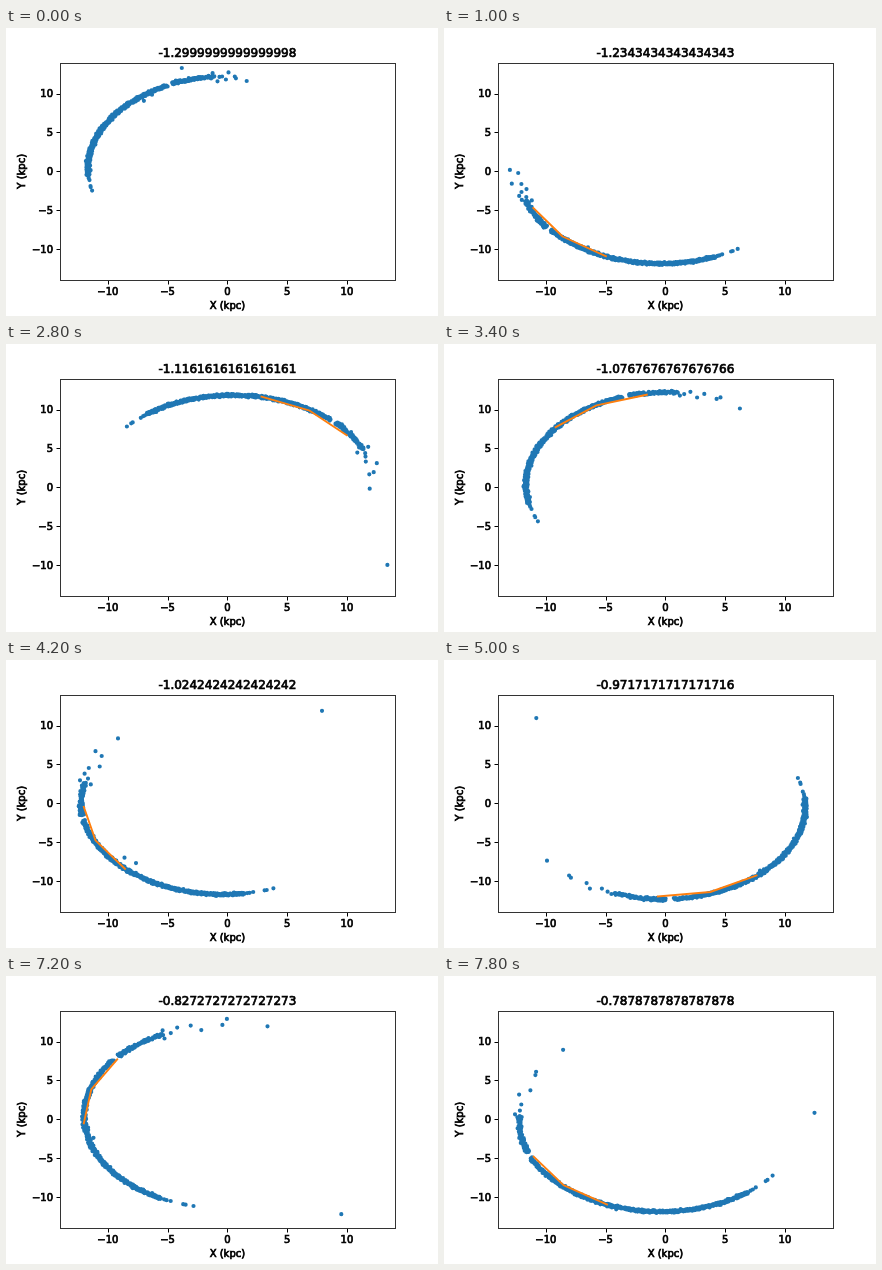
An HTML page that plays this animation: 432 by 288 pixels, repeating every 8000 ms.

```html
<!DOCTYPE html>
<html lang="en">
<head>
<meta charset="utf-8">
<title>Stream orbit</title>
<style>
  html, body { margin: 0; width: 100%; height: 100%; overflow: hidden; background: #fff; }
  svg { display: block; width: 100%; height: 100%; }
  text { font: 10px "DejaVu Sans", sans-serif; stroke: #000; stroke-width: .7px; text-anchor: middle; }
  #title { font-size: 12px; }
  .axes { fill: none; stroke: #000; }
  rect.axes { stroke: #333; }
</style>
</head>
<body>
<svg viewBox="0 0 432 288">
  <defs><clipPath id="box"><rect x="54" y="34.6" width="334.8" height="217.4"/></clipPath></defs>
  <g clip-path="url(#box)" fill="none">
    <path id="dots" stroke="#1f77b4" stroke-width="4.2" stroke-linecap="round"/>
    <path id="trail" stroke="#ff7f0e" stroke-width="1.9" stroke-linecap="square" stroke-linejoin="round"/>
  </g>
  <path id="ticks" class="axes"/>
  <rect class="axes" x="54.5" y="35.5" width="335" height="217"/>
  <g id="labels"></g>
  <text id="title" x="221.4" y="28.5"></text>
  <text x="221.4" y="280.6">X (kpc)</text>
  <text transform="translate(19.4 143.3) rotate(-90)">Y (kpc)</text>
</svg>
<script>
const STEPS = 40, STEP_MS = 200;
const $ = id => document.getElementById(id);
const px = x => 221.4 + x * 11.957;
const py = y => 143.28 - y * 7.766;
const snap = v => Math.floor(v + .5) + .5;
const rad = deg => deg * Math.PI / 180;

let seed = 11;
function rnd() {
  seed = (seed * 16807) % 2147483647;
  return seed / 2147483647;
}
const bell = () => (rnd() + rnd() + rnd() - 1.5) / 1.5;

// Time runs from -1.3 to 0 in 99 steps, rounded toward zero in double precision
function time(k) {
  const n = 13 * (99 - k), bits = n > 990 ? 52 : 53;
  return -Number((BigInt(n) << BigInt(bits)) / 990n) / 2 ** bits;
}

// Angle of the stream's centre after k steps
const head = k => 139.6 + 21.19 * k;

function polar(deg, r) {
  return px(r * Math.cos(rad(deg))).toFixed(1) + ' ' + py(r * Math.sin(rad(deg))).toFixed(1);
}

// Each star maps a step to [offset from the centre in degrees, radius]
const stars = [];

function lead(d0, width) {
  const dr = bell() * width, rate = .013 * (d0 - 9);
  stars.push(k => {
    const d = d0 + rate * k;
    return [d, 12.01 - .0075 * d + .08 * Math.cos(rad(head(k) + d + 50)) + dr];
  });
}

function tail(d0, rate, amp) {
  const phase = rnd() * 360, dr = bell() * .2;
  stars.push(k => {
    const d = d0 + rate * k;
    return [d, 12.3 + dr + .1 * Math.cos(rad(head(k) + d + 50)) + amp * Math.sin(rad(phase + 24 * k))];
  });
}

for (let i = 0; i < 750; i++) lead(-25 + 68 * (i + rnd()) / 750, .24);
for (const d of [44, 44.8, 46, 49.8, 50.5, 52.8]) lead(d, .1);
for (let i = 0; i < 130; i++) {
  const u = rnd() ** 1.3;
  tail(-27.5 - 17 * u, -.47 - .13 * u, .08);
}
for (const d of [44, 45.5, 46.5, 47.5, 49, 50, 52.5, 53, 57.5])
  tail(-d, -.6 - .07 * Math.max(0, d - 46), .1 + .5 * rnd());

// Two strays that dip inside the stream
for (const [d0, rate, r] of [[-12, .6, 11.45], [-17, .55, 11.7]])
  stars.push(k => [d0 + rate * k, r + .6 * Math.cos(rad(30 * (k - 15)))]);

// One far straggler: step, offset, radius
const far = [[0, -33.6, 13.83], [9, -92.5, 12.35], [14, -113, 16.7], [21, -168.2, 14.3],
  [30, -183, 16.75], [36, -234.5, 15.5], [39, -242.2, 12.5]];
stars.push(k => {
  const i = Math.max(1, far.findIndex(p => p[0] >= k));
  const a = far[i - 1], b = far[i], u = (k - a[0]) / (b[0] - a[0]);
  return [a[1] + (b[1] - a[1]) * u, a[2] + (b[2] - a[2]) * u];
});

let ticks = '', labels = '';
for (let v = -10; v <= 10; v += 5) {
  const name = String(v).replace('-', '\u2212');
  ticks += `M${snap(px(v))} 252.5v4M54.5 ${snap(py(v))}h-4`;
  labels += `<text x="${px(v)}" y="266.8">${name}</text>` +
    `<text x="47" y="${py(v) + 3.8}" style="text-anchor:end">${name}</text>`;
}
$('ticks').setAttribute('d', ticks);
$('labels').innerHTML = labels;

function draw(k) {
  $('title').textContent = time(k);
  $('dots').setAttribute('d', stars.map(star => {
    const [d, r] = star(k);
    return 'M' + polar(head(k) + d, r) + 'h0';
  }).join(''));
  const path = [k - 2, k - 1, k].filter(j => j >= 0).map(j => polar(head(j), 12.02));
  $('trail').setAttribute('d', path.length > 1 ? 'M' + path.join('L') : '');
}

const t0 = performance.now();
let shown = -1;
function tick() {
  const k = Math.floor((performance.now() - t0) / STEP_MS) % STEPS;
  if (k !== shown) draw(shown = k);
  requestAnimationFrame(tick);
}
tick();
</script>
</body>
</html>
```
